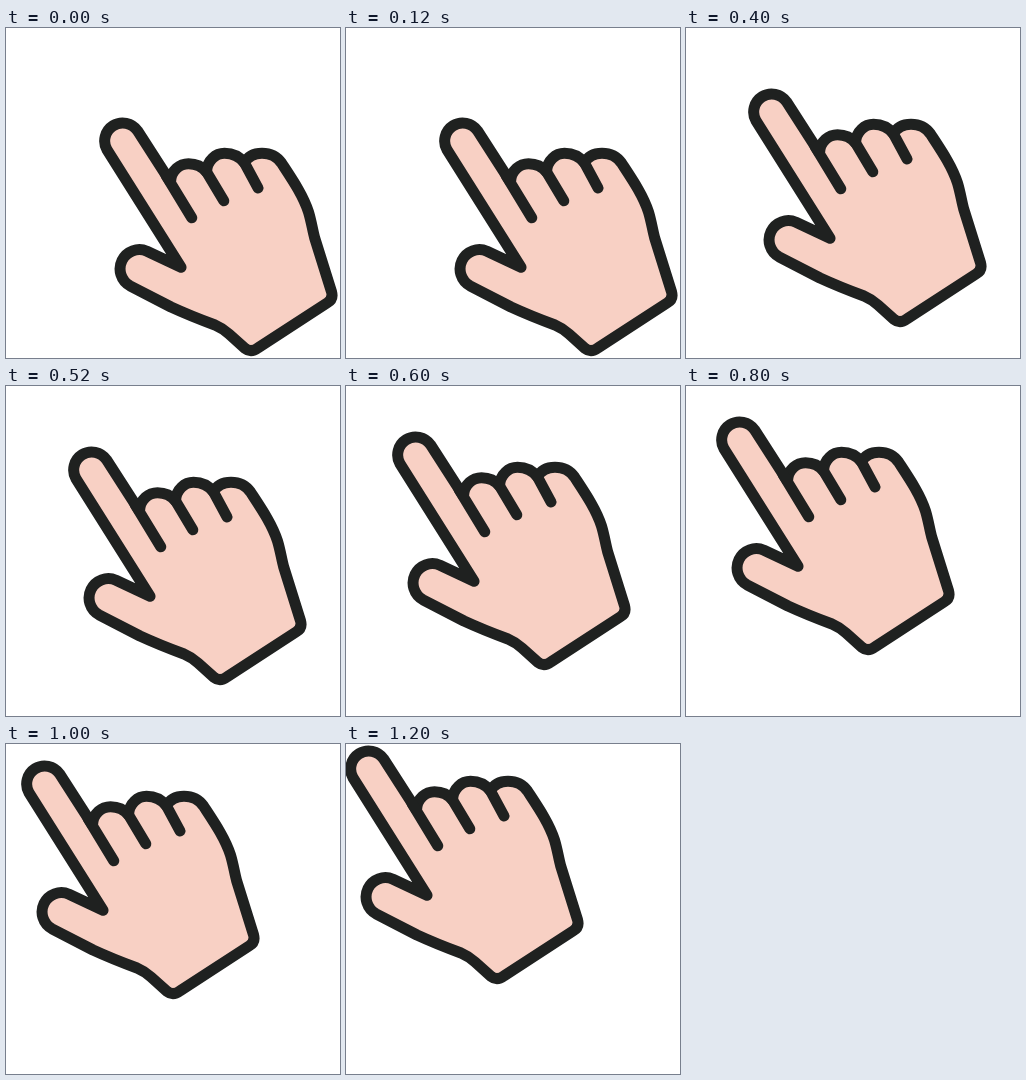
Write an HTML page that moves like this. It is 334x330 px and loops after 1400 ms.

```html
<!DOCTYPE html>
<html lang="en">
<head>
<meta charset="utf-8">
<title>Pointing hand</title>
<style>
  html, body { margin: 0; width: 100%; height: 100%; overflow: hidden; background: #fff; }
  svg { display: block; width: 100vw; height: 100vh; }
  #hand { fill: #f8d0c4; stroke: #1f2120; stroke-width: 11; stroke-linecap: round; stroke-linejoin: round; }
  .crease { fill: none; }
</style>
</head>
<body>
<svg viewBox="0 0 334 330">
  <g id="hand">
    <path d="M175 239.3 L101 121.8 A18 18 0 0 1 131.4 102.6 L164.5 154
      C165 142 174 135.8 182.5 135.8 C190.5 135.8 196.5 139 200.5 144
      C201 132 210 125.3 218.5 125.3 C227.5 125.3 234 129 238.5 135
      C242 128 249 125.2 256 125.2 C264.5 125.2 271 128.5 275.5 135
      C286 151 297 167 302.5 184 C305.5 194 306.5 202 308.7 210
      L325.6 264 Q327.5 271.5 321 275 L252 319.8 Q245 325 239 320.3
      L223 306 Q217 300.5 209 297 C190 290 178 285 165 279 L124 257.8
      A19.3 19.3 0 0 1 141 223.2 Z"/>
    <path class="crease" d="M160 147.5 L185.8 189.8 M200 143 L217.8 172.8 M238 134 L252 160"/>
  </g>
</svg>
<script>
  const STEPS = 7, HOLD = 200;
  const dx = -47 / 3, dy = -44 / 3;

  // Whole-pixel moves, each held until the next; the last one closes the loop.
  const frames = Array.from({ length: STEPS + 1 }, (_, i) => {
    const k = Math.min(i, STEPS - 1);
    return {
      offset: i / STEPS,
      easing: 'step-end',
      transform: `translate(${Math.round(dx * k)}px, ${Math.round(dy * k)}px)`
    };
  });

  document.getElementById('hand').animate(frames, { duration: STEPS * HOLD, iterations: Infinity });
</script>
</body>
</html>
```
